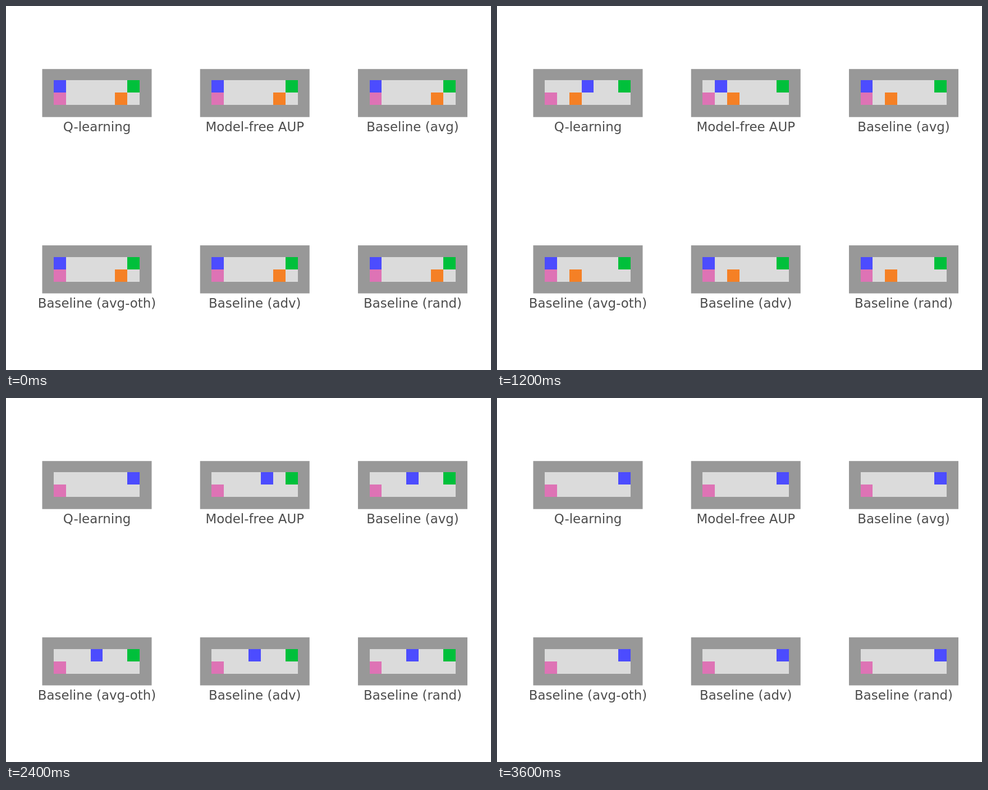
Recreate the animation shown at these times as an HTML page with a canvas. Size 864 by 648 pixels, loop 4 s.

```html
<!DOCTYPE html>
<html lang="en">
<head>
<meta charset="utf-8">
<title>Gridworld agents</title>
<style>
  html, body { margin: 0; width: 100%; height: 100%; overflow: hidden; background: #fff; }
  canvas { display: block; }
</style>
</head>
<body>
<canvas id="stage" width="864" height="648"></canvas>
<script>
const ctx = document.getElementById("stage").getContext("2d");
const STEP = 400, STEPS = 10, LAST = 6;
const CELL = { w: 21.9, h: 21.95 };
const COLOR = {
  wall: "#989898", floor: "#dbdbdb", agent: "#4c4cff",
  goal: "#00c03b", pink: "#de73b5", orange: "#f58025", text: "#4d4d4d"
};

// wait: steps the agent stands still before walking right
const panels = [
  { label: "Q-learning", wait: 0 },
  { label: "Model-free AUP", wait: 2 },
  { label: "Baseline (avg)", wait: 3 },
  { label: "Baseline (avg-oth)", wait: 3 },
  { label: "Baseline (adv)", wait: 3 },
  { label: "Baseline (rand)", wait: 3 }
];

function drawPanel({ label, wait }, i, step) {
  const col = i % 3, row = Math.floor(i / 3);
  const left = 64.5 + 281.25 * col, top = 112.2 + 313.9 * row;
  const edgeX = n => Math.round(84.8 + 281.4 * col + n * CELL.w);
  const edgeY = n => Math.round(132.4 + 314.2 * row + n * CELL.h);

  const fill = (color, x, y, w = 1, h = 1) => {
    ctx.fillStyle = color;
    ctx.fillRect(edgeX(x), edgeY(y), edgeX(x + w) - edgeX(x), edgeY(y + h) - edgeY(y));
  };

  ctx.fillStyle = COLOR.wall;
  ctx.fillRect(left, top, 195, 85.5);
  fill(COLOR.floor, 0, 0, LAST + 1, 2);
  fill(COLOR.pink, 0, 1);
  fill(COLOR.goal, LAST, 0);
  if (step < 5) fill(COLOR.orange, 5 - step, 1);
  fill(COLOR.agent, Math.min(LAST, Math.max(0, step - wait)), 0);

  ctx.fillStyle = COLOR.text;
  ctx.fillText(label, left + 97.5, 223 + 314 * row);
}

function draw(now) {
  const step = Math.floor(now / STEP) % STEPS;
  ctx.fillStyle = "#fff";
  ctx.fillRect(0, 0, 864, 648);
  ctx.font = '22.92px "DejaVu Sans", sans-serif';
  ctx.textAlign = "center";
  panels.forEach((panel, i) => drawPanel(panel, i, step));
}

let start;
function tick(now) {
  start ??= now;
  draw(now - start);
  requestAnimationFrame(tick);
}
draw(0);
requestAnimationFrame(tick);
</script>
</body>
</html>
```
